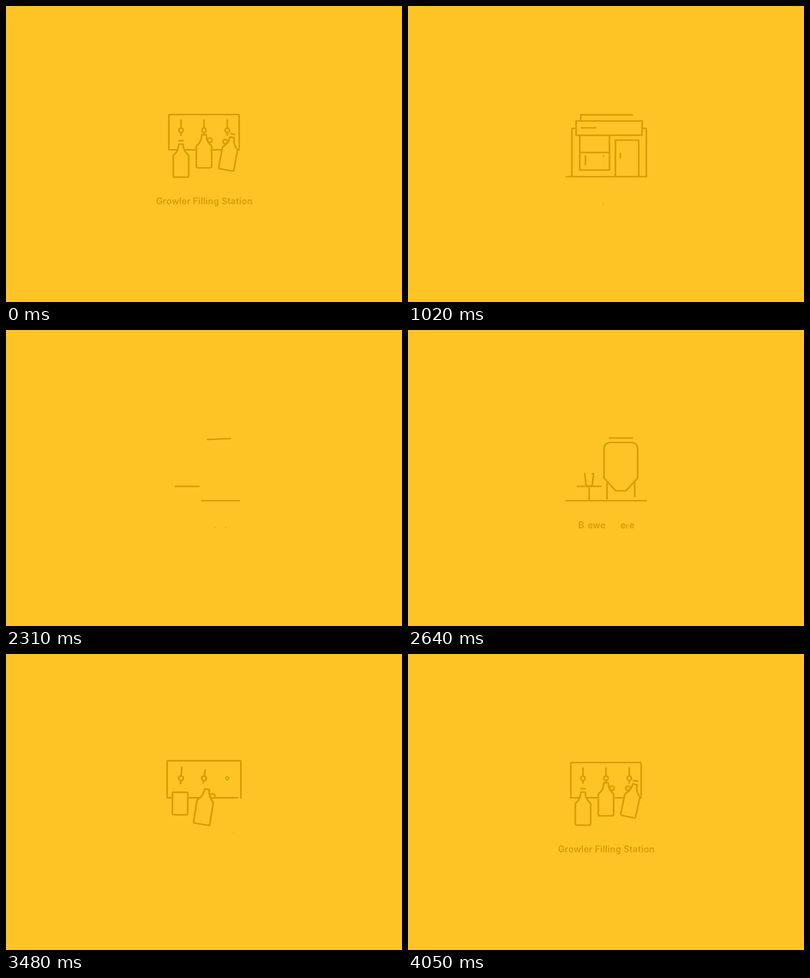
Animation of 800 by 600 pixels, one loop 4080 ms. Source, as an HTML page:

```html
<!DOCTYPE html>
<html lang="en">
<head>
<meta charset="utf-8">
<title>Brewery icons</title>
<style>
  html, body { margin: 0; width: 100%; height: 100%; overflow: hidden; background: #fec425; }
  svg { display: block; width: 800px; height: 600px; }
  path, circle { fill: none; stroke: #d79c04; stroke-width: 3.2; stroke-linecap: round; stroke-linejoin: round; }
  .solid { fill: #fec425; }
  text { font: 600 18px Inter, sans-serif; fill: #d79c04; }
</style>
</head>
<body>
<svg id="stage" viewBox="0 0 800 600"></svg>
<script>
const LOOP = 4080;
const stage = document.getElementById('stage');
const pen = document.createElement('canvas').getContext('2d');

const clamp = v => Math.max(0, Math.min(1, v));
const span = (t, start, dur) => clamp((t - start) / dur);
const mix = (a, b, p) => a + (b - a) * p;
const smooth = p => p * p * (3 - 2 * p);
const easeOut = p => 1 - (1 - p) ** 3;
const back = p => p <= 0 ? 0 : 1 + 2.7 * (p - 1) ** 3 + 1.7 * (p - 1) ** 2;

// Each key is [time, ...values]
function keyed(t, keys) {
  const next = keys.findIndex(k => k[0] > t);
  if (next === 0) return keys[0].slice(1);
  if (next < 0) return keys[keys.length - 1].slice(1);
  const from = keys[next - 1], to = keys[next];
  const p = smooth(span(t, from[0], to[0] - from[0]));
  return from.slice(1).map((v, i) => mix(v, to[i + 1], p));
}

const group = (transform, inner) => `<g transform="${transform}">${inner}</g>`;

// Part of a path between the fractions a and b
function line(d, a = 0, b = 1, cls = '') {
  if (b - a < 0.002) return '';
  const dash = a > 0 || b < 1
    ? `pathLength="1" stroke-dasharray="${b - a} 2" stroke-dashoffset="${-a}"` : '';
  return `<path class="${cls}" d="${d}" ${dash}/>`;
}

// Draws in from the start, then closes towards the fraction mid
function drawn(t, d, [inAt, inDur], [outAt, outDur], mid = 0.5, cls = '') {
  const o = span(t, outAt, outDur);
  return line(d, mid * o, easeOut(span(t, inAt, inDur)) * (1 - (1 - mid) * o), cls);
}

// Letters grow and shrink from the baseline; the digits give their order
function caption(t, words, order, [inAt, inDur], [outAt, outDur]) {
  const grow = 110, gap = 0.2;
  pen.font = '600 18px Inter, sans-serif';
  const left = 400.5 - (pen.measureText(words).width + gap * (words.length - 1)) / 2;
  return [...words].map((c, i) => {
    const rank = order[i] / 9;
    const size = easeOut(span(t, inAt + rank * (inDur - grow), grow))
      * (1 - span(t, outAt + rank * (outDur - grow), grow));
    if (c === ' ' || size < 0.01) return '';
    const x = left + pen.measureText(words.slice(0, i)).width + gap * i;
    const glyph = c === '&' ? '&amp;' : c;
    return `<text transform="translate(${x} 402) scale(${size})">${glyph}</text>`;
  }).join('');
}

function bottle([x, y, turn, size, neck], ring, cap) {
  if (size < 0.01) return '';
  const w = mix(15.5, 4.5, neck), h = mix(45, 67, neck);
  const x1 = mix(15.5, 5, neck), y1 = mix(-45, -55, neck);
  const x2 = mix(15.5, 9, neck), y2 = mix(-44, -50, neck);
  const body = `M${-w} ${-h}H${w}C${x1} ${y1} ${x2} ${y2} 15.5 -44V-3Q15.5 0 12.5 0`
    + `H-12.5Q-15.5 0 -15.5 -3V-44C${-x2} ${y2} ${-x1} ${y1} ${-w} ${-h}Z`;
  return group(`translate(${x} ${y}) rotate(${turn}) scale(${size})`,
    (ring ? `<circle class="solid" cx="${ring}" cy="-56" r="4.5"/>` : '')
    + line(body, 0, 1, 'solid')
    + line('M-4.3 -74H4.3', 0.5 - cap / 2, 0.5 + cap / 2));
}

function tap(t, x, start, shrink) {
  const p = span(t, start, 300), size = back(p) * shrink;
  if (size < 0.01) return '';
  const reach = clamp((p - 0.18) / 0.4);
  const bars = reach && line(`M0 -5V${-5 - 16 * reach}`) + line(`M0 5V${5 + 5 * reach}`);
  return group(`translate(${x} 252) rotate(${15 * (1 - p)}) scale(${size})`,
    '<circle r="4.5"/>' + (bars || ''));
}

function growlers(t) {
  if (t < 700) t += LOOP;
  if (t < 3180 || t > 4780) return '';
  const out = span(t, 4530, 210), shrink = 1 - out * out;
  const big = 1.05 - 0.05 * easeOut(span(t, 3480, 250));
  const pose = keys => {
    const k = keyed(t, keys);
    k[3] *= shrink;
    return k;
  };
  const first = pose([[3250, 349, 362, 8, 0, 0], [3450, 351.5, 326, 1.5, 1, 0],
    [3500, 351.5, 326, 0, 1, 0.05], [3720, 353.5, 347, 0, 1, 1]]);
  const second = pose([[3310, 384, 364, 20, 0, 1], [3480, 395, 345, 9, 1.07, 1],
    [3720, 400, 328, 0, 1, 1]]);
  const third = pose([[3465, 458, 364, 24, 0, 1], [3480, 458, 363.5, 24, 0.05, 1],
    [3760, 443, 327, 15, 1.05, 1], [4020, 444, 328.5, 13, 1, 1], [4230, 447, 347, 0, 1, 1]]);
  const board = 'M471 291.5V222Q471 220 469 220H331Q329 220 329 222V291.5H471';
  return group(`translate(400 292) scale(${big}) translate(-400 -292)`,
      line(board, out / 2, span(t, 3190, 295) * (1 - out / 2)))
    + [353.5, 400, 447].map((x, i) => tap(t, x, 3270 + 78 * i, shrink)).join('')
    + bottle(first, 0, span(t, 3680, 150))
    + bottle(second, 12, 0)
    + bottle(third, -12, span(t, 3740, 150))
    + caption(t, 'Growler Filling Station', '61830527409183852741960', [3560, 500], [4530, 200]);
}

function shop(t) {
  if (t < 610 || t > 2560) return '';
  const settle = 1 - easeOut(span(t, 720, 220));
  const wallIn = span(t, 630, 135), wallOut = span(t, 1860, 531);
  const paneIn = span(t, 620, 109), paneOut = span(t, 1900, 300);
  const roofOut = span(t, 2040, 409);
  const slide = smooth(span(t, 2100, 210));
  const lift = 1 - back(span(t, 900, 300));
  const wall = 'M319.5 346H481.5V250Q481.5 248 479.5 248H333Q331 248 331 250V346';
  const part = (d, at, outAt, cls) => drawn(t, d, [at, 220], [outAt, 220], 0.5, cls);
  return group(`translate(400 346) scale(${1 + 0.075 * settle} ${1 + 0.14 * settle}) translate(-400 -346)`,
      line(wall, 0.069 * (1 - wallIn) + 0.177 * wallOut, wallIn * (1 - 0.823 * wallOut)))
    + group(`translate(${6.5 * settle} ${-1.5 * settle})`,
      line('M347 332V262H407V332.5H347', 0.18 * (1 - paneIn) + paneOut / 2, paneIn * (1 - paneOut / 2)))
    + group(`translate(${-5 * slide} ${20 * slide})`,
      drawn(t, 'M347 297H407', [800, 200], [2250, 300], 0))
    + part('M358.5 304V332', 960, 1900)
    + part('M395 304V332', 1020, 1940)
    + part('M367 322.5H386', 1080, 1960)
    + part('M376.5 322.5V332', 1140, 1880)
    + part('M377 262V268L369 277.5H385', 1170, 1850)
    + part('M419 346V272H466V346', 800, 1980)
    + part('M429 298.5V318', 980, 1860)
    + group(`translate(0 ${14 * lift}) rotate(${-2.5 * clamp(roofOut * 1.5)} 430 220.5)`,
      drawn(t, 'M349 232V221H464V232', [920, 220], [2040, 409], 0.76))
    + part('M339.5 233H473V262H339.5Z', 790, 2000, 'solid')
    + part('M350.5 247H462.5', 1000, 1870)
    + caption(t, 'Beer & Food', '24880105939', [980, 420], [1840, 495]);
}

function brewhouse(t) {
  if (t < 2320 || t > 3140) return '';
  const part = (d, at, mid) => drawn(t, d, [at, 260], [2880 + (at - 2330) / 5, 150], mid);
  const rise = span(t, 2890, 160);
  return part('M319.5 346H481.5', 2350)
    + part('M342 317H390', 2400)
    + part('M366 317V346', 2450)
    + part('M357 291L360 316H372L375 291Z', 2530)
    + part('M430 228H450Q464 228 464 242V300L440 326H420L396 300V242Q396 228 410 228H430', 2340)
    + part('M402 309V346', 2500)
    + part('M458 309V346', 2540)
    + group(`translate(0 ${-52 * rise * rise})`, part('M407 219H453', 2360))
    + caption(t, 'Brewed Here', '37150809462', [2380, 430], [2870, 250]);
}

function render(now) {
  const t = now % LOOP;
  stage.innerHTML = growlers(t) + shop(t) + brewhouse(t);
  requestAnimationFrame(render);
}

const begin = performance.now();
requestAnimationFrame(function first() {
  render(Math.max(0, performance.now() - begin));
  // Keep the clock relative to page load
});
</script>
</body>
</html>
```
